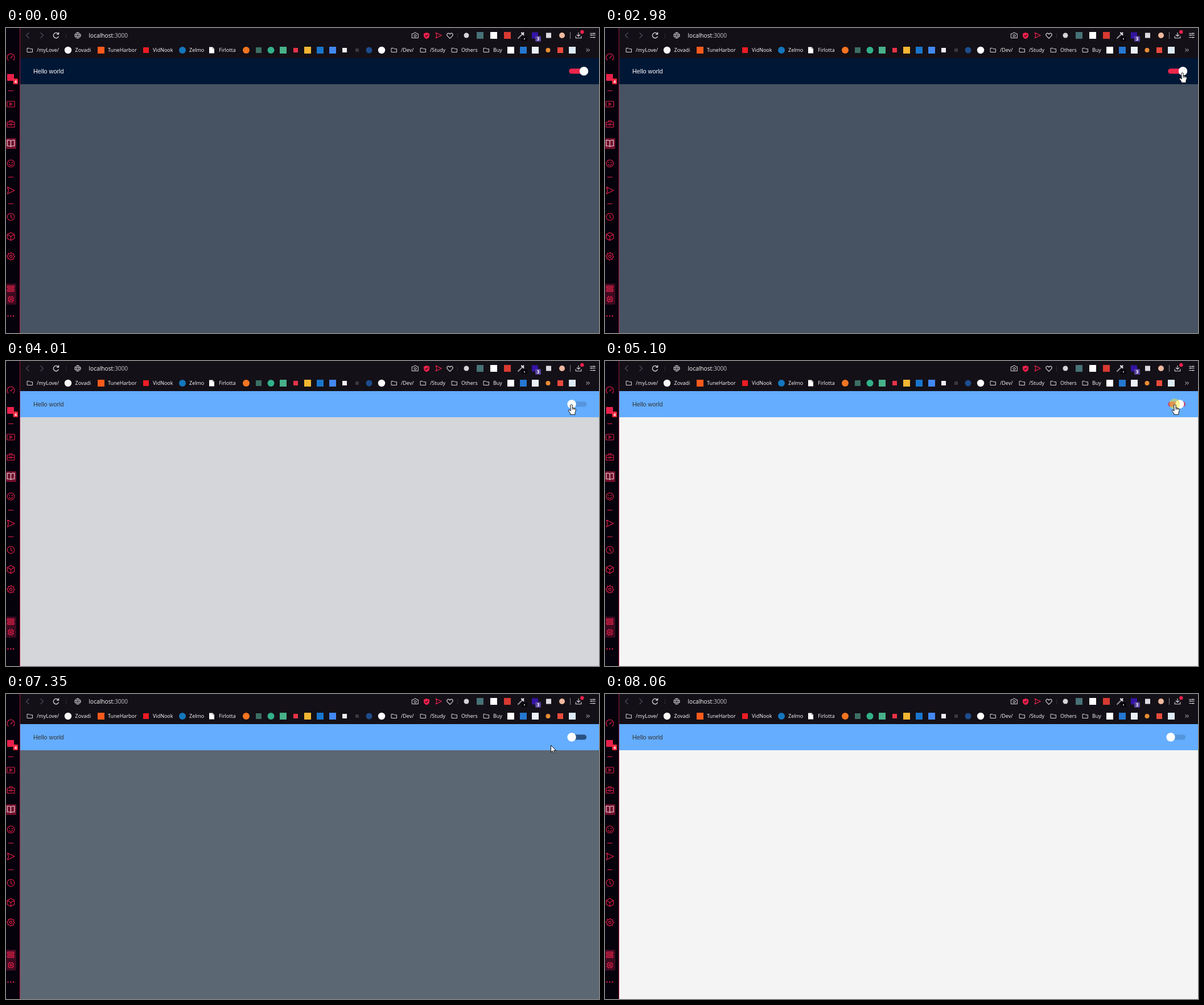
These frames come from a looping animation (1042 by 537 pixels, 8600 ms). An HTML page with a canvas:

```html
<!DOCTYPE html>
<html lang="en">
<head>
<meta charset="utf-8">
<title>Theme switch</title>
<style>
html, body { margin: 0; width: 100%; height: 100%; overflow: hidden; background: #141017; }
canvas { display: block; }
</style>
</head>
<body>
<canvas id="stage" width="1042" height="537"></canvas>
<script>
const W = 1042, H = 537, LOOP = 8600;
const stage = document.getElementById('stage').getContext('2d');
const RED = '#e8204a', PALE = '#dcd9df';

// ---------- drawing helpers ----------
function rect(g, x, y, w, h, color, radius = 0) {
  g.fillStyle = color;
  g.beginPath();
  g.roundRect(x, y, w, h, radius);
  g.fill();
}
function disc(g, x, y, r, color) {
  g.fillStyle = color;
  g.beginPath();
  g.arc(x, y, r, 0, Math.PI * 2);
  g.fill();
}
function text(g, str, x, y, font, color) {
  g.font = font;
  g.fillStyle = color;
  g.fillText(str, x, y);
}
// Path drawn around its own centre
function icon(g, x, y, d, stroke, fill, width = 1.1) {
  const path = new Path2D(d);
  g.save();
  g.translate(x, y);
  g.lineWidth = width;
  g.lineJoin = g.lineCap = 'round';
  if (fill) { g.fillStyle = fill; g.fill(path); }
  if (stroke) { g.strokeStyle = stroke; g.stroke(path); }
  g.restore();
}
const ring = r => `M${r} 0A${r} ${r} 0 1 1 ${-r} 0A${r} ${r} 0 1 1 ${r} 0Z`;
const FOLDER = 'M-4.5-3.5H-1L.3-2.2H4.5V3.5H-4.5Z';

// ---------- browser chrome ----------
function drawSidebar(g) {
  rect(g, 0, 0, 24, H, '#05020c');
  const edge = g.createLinearGradient(0, 0, 0, H);
  edge.addColorStop(0, '#941938');
  edge.addColorStop(1, '#bd1f45');
  rect(g, 24, 0, 1, H, edge);
  rect(g, 0, 194, 18, 19, '#720f2c', 2);
  rect(g, 0, 450, 18, 37, '#3e0a20', 2);

  const line = (y, d) => icon(g, 8.5, y, d, RED);
  line(51.5, 'M-4.5 5A6.5 6.5 0 1 1 4.5 5M0 1L3.2-2.4M-.6 1.3H.6');
  rect(g, 2, 81, 12, 12, RED);
  rect(g, 12.5, 89, 8.5, 10, '#f5283f', 1.5);
  text(g, '4', 14.7, 97, 'bold 7.5px "Open Sans", sans-serif', '#fff');
  for (const y of [110, 262, 309]) rect(g, 4, y, 9, 1, RED);
  line(134, 'M-5.5-5H5.5Q6.7-5 6.7-4V4Q6.7 5 5.5 5H-5.5Q-6.7 5-6.7 4V-4Q-6.7-5-5.5-5ZM-1.6-2.4L2.3 0L-1.6 2.4Z');
  line(169, 'M-6.5-3.5H6.5V5.5H-6.5ZM-2.5-3.5V-6H2.5V-3.5M-6.5 .8H-1.5M1.5 .8H6.5M-1.5-.3H1.5V2H-1.5Z');
  icon(g, 8.5, 203, 'M0-4Q-1-5.5-3-5.5H-6.3V4.8H-2.5Q-.6 4.8 0 6Q.6 4.8 2.5 4.8H6.3V-5.5H3Q1-5.5 0-4V5.5', '#f1dce2');
  line(238.5, ring(6.3) + 'M-3.3 1.3Q0 5.5 3.3 1.3M-3-2H-1.8M1.4-1.6H3.3');
  line(286, 'M-6-6L6.5 0L-6 6L-4 0Z');
  line(332.5, ring(6.3) + 'M0-3.8V0L2.6 2.6');
  line(367, 'M0-7L6.3-3.5V3.5L0 7L-6.3 3.5V-3.5ZM-6.3-3.5L0 0L6.3-3.5M0 0V7');
  // Cog outline
  let cog = '';
  for (let i = 0; i < 32; i++) {
    const a = i * Math.PI / 16, r = i % 4 < 2 ? 6.7 : 5;
    cog += `${i ? 'L' : 'M'}${(r * Math.cos(a)).toFixed(2)} ${(r * Math.sin(a)).toFixed(2)}`;
  }
  line(402, cog + 'Z' + ring(2.1));
  // Memory and processor meters
  for (const y of [454, 460]) {
    rect(g, 3, y, 11, 4, '#8d1631');
    icon(g, 8.5, y + 2, 'M-5.5-2H5.5V2H-5.5Z', RED, null, 1);
  }
  line(477.5, 'M-3.8-3.8H3.8V3.8H-3.8ZM-1.3-1.3H1.3V1.3H-1.3ZM-2-5.4V-4M2-5.4V-4M-2 4V5.4M2 4V5.4M-5.4-2H-4M-5.4 2H-4M4-2H5.4M4 2H5.4');
  for (const x of [3.5, 8.3, 13.1]) disc(g, x, 507, 1.2, RED);
}

function drawToolbar(g) {
  icon(g, 38, 13, 'M2.2-4.6L-2.4 0L2.2 4.6', '#57525c');
  icon(g, 63, 13, 'M-2.2-4.6L2.4 0L-2.2 4.6', '#57525c');
  icon(g, 88, 13, 'M4.3 2A4.7 4.7 0 1 1 3.2-3.4M4.6-5V-2H1.6', PALE, null, 1.3);
  for (const x of [105, 793])
    for (const y of [10, 13, 16]) rect(g, x, y, 1, 1, '#625c67');
  icon(g, 126, 13, ring(5) + 'M-5-1.6H5M-5 1.6H5M0-5Q-4.5 0 0 5Q4.5 0 0-5', PALE, null, 0.9);
  const font = '10.2px "Open Sans", sans-serif';
  text(g, 'localhost', 145.5, 17, font, '#fff');
  const hostWidth = g.measureText('localhost').width;
  text(g, ':3000', 145.5 + hostWidth, 17, font, '#c4c0c7');

  icon(g, 719, 13, 'M-5.3-3H-2.6L-1.5-4.8H1.5L2.6-3H5.3V4.5H-5.3ZM2 .6A2 2 0 1 1-2 .6A2 2 0 1 1 2 .6', PALE, null, 1);
  icon(g, 739, 13.5, 'M0-5.5L5-3.7V0Q5 4 0 5.8Q-5 4-5 0V-3.7Z', null, '#f3204c');
  icon(g, 739, 13.5, 'M-2.2-.2L-.5 1.5L2.4-1.6', '#17111a');
  icon(g, 760, 13, 'M-4.8-4.8L5.3 0L-4.8 4.8L-3 0Z', '#ed244e');
  icon(g, 780, 13.5, 'M0 4.8L-4.5 .3Q-6.2-2-4.2-3.9Q-1.8-5.4 0-2.6Q1.8-5.4 4.2-3.9Q6.2-2 4.5 .3Z', PALE);

  // Extension buttons
  disc(g, 809, 13, 4.5, '#d5d3d6');
  rect(g, 827, 7, 12, 12, '#477277');
  rect(g, 851, 7, 12, 12, '#fff');
  rect(g, 875, 7, 12, 12, '#d83a31');
  icon(g, 905, 13, 'M-5 5L2-2', '#9b969e', null, 2);
  icon(g, 905, 13, 'M1-4.5L4.5-1M2.7-2.7L4.5-4.5', '#eeecef', null, 2.2);
  rect(g, 906, 15, 10, 8, '#08060a', 1);
  rect(g, 910, 18.5, 2, 1.5, '#fff');
  rect(g, 924, 7.5, 11, 11, '#3414a5');
  rect(g, 930, 14, 10, 10, '#56409c', 1.5);
  text(g, '3', 932.8, 22, 'bold 8px "Open Sans", sans-serif', '#fff');
  rect(g, 949, 8.5, 9, 9, '#dedce0');
  disc(g, 977, 13, 5, '#efb99f');

  rect(g, 991, 7, 1, 12, '#86818a');
  icon(g, 1006, 13, 'M0-4.8V1.5M-2.7-1L0 1.7L2.7-1M-4.8 1.5V4.8H4.8V1.5', PALE);
  disc(g, 1012.3, 7, 3.2, '#f5204d');
  icon(g, 1031, 13, 'M-4.5-3.5H4.5M-4.5-.5H4.5M-4.5 3.5H4.5M2-4.4V-2.6M-2-1.4V.4M2 2.6V4.4', PALE, null, 1);
}

function drawBookmarks(g) {
  const label = (str, x) => text(g, str, x, 42, '9px "Open Sans", sans-serif', '#fff');
  const folders = [[42, '/myLove/', 54], [682, '/Dev/', 694], [733, '/Study', 745], [788, 'Others', 800], [844, 'Buy', 856]];
  for (const [x, name, tx] of folders) {
    icon(g, x, 39, FOLDER, PALE, null, 1);
    label(name, tx);
  }
  label('Zovadi', 121.5);
  label('TuneHarbor', 179);
  label('VidNook', 258);
  label('Zelmo', 322);
  label('Firlotta', 374);
  icon(g, 361.5, 39, 'M-4.5-5.5H1.5L4.5-2.5V5.5H-4.5Z', null, '#fff');
  icon(g, 361.5, 39, 'M1.5-5.5V-2.5H4.5', '#8f8c92', null, 0.8);

  const circles = [[109, 6.2, '#f7f7f7'], [310, 6, '#1476bd'], [422, 6, '#f47521'], [465.5, 6, '#32b189'],
    [638, 5.5, '#1d4d8d'], [660, 6.2, '#fff'], [952.5, 4, '#e98c35']];
  for (const [x, r, color] of circles) disc(g, x, 39, r, color);

  const squares = [[167, 12, '#fb5a1c'], [246, 10, '#ed1c24'], [444, 10, '#3c6f63'], [487, 12, '#48b18a'],
    [509, 8, '#e93348'], [530, 12, '#f2b632'], [552, 12, '#1976cc'], [574, 12, '#4388f3'],
    [595, 8, '#f0eef0'], [617, 6, '#3b373e'], [887, 12, '#fff'], [909, 12, '#2578d1'],
    [930, 12, '#eaf0f5'], [974, 10, '#ea4a3c'], [995, 12, '#dceaf5']];
  for (const [x, size, color] of squares) rect(g, x - size / 2, 39 - size / 2, size, size, color);
  icon(g, 1022.5, 39, 'M-2.7-2.3L-.4 0L-2.7 2.3M.6-2.3L2.9 0L.6 2.3', PALE, null, 1);
}

const chrome = document.createElement('canvas');
chrome.width = W;
chrome.height = H;
{
  const g = chrome.getContext('2d');
  rect(g, 0, 0, W, 53, '#141017');
  drawSidebar(g);
  drawToolbar(g);
  drawBookmarks(g);
}

// ---------- motion ----------
const clamp = v => Math.min(1, Math.max(0, v));
const mix = (a, b, p) => a + (b - a) * p;
const blend = (a, b, p) => a.map((v, i) => mix(v, b[i], p));
const rgb = c => `rgb(${c.map(Math.round)})`;

// Equivalent of the CSS "ease" curve
function ease(x) {
  if (x <= 0 || x >= 1) return clamp(x);
  let lo = 0, hi = 1;
  for (let i = 0; i < 18; i++) {
    const s = (lo + hi) / 2, q = 1 - s;
    if (0.75 * s * q + s * s * s < x) lo = s; else hi = s;
  }
  const s = lo, q = 1 - s;
  return 0.3 * s * q * q + 3 * s * s * q + s * s * s;
}
const ramp = (t, start, length) => ease((t - start) / length);

const isLight = t => t >= 3690 && t < 5400 || t >= 7210;
const switchOn = t => 1 - ramp(t, 3270, 150) + ramp(t, 5035, 150) - ramp(t, 6830, 150);
function bodyLight(t) {
  if (t > 5810 && t < 5960) t = 5810;
  return ramp(t, 3735, 540) - ramp(t, 5423, 700) + ramp(t, 7257, 800);
}

const CLICKS = [[3210, 993], [4990, 1001], [6790, 1004]];
const POINTER = [
  [340, 946, 518], [500, 913, 424], [600, 908, 362], [700, 924, 318], [790, 936, 292], [900, 912, 313],
  [1180, 912, 313], [1230, 883, 304], [1400, 782, 299], [1590, 697, 280], [1655, 697, 280], [1730, 657, 240],
  [1850, 690, 180], [2030, 828, 125], [2300, 930, 105], [2550, 1028, 85], [2750, 1014, 78],
  [2980, 1014, 78], [3200, 993, 76], [4680, 993, 76], [4950, 1001, 76], [5250, 1001, 76],
  [5570, 1004, 77], [5810, 1015, 88], [6330, 1015, 88], [6550, 1012, 78], [6750, 1004, 76],
  [6950, 1003, 76], [7160, 957, 87], [7350, 957, 90], [7500, 957, 90], [7900, 948, 537]
];
function pointerAt(t) {
  const next = POINTER.findIndex(k => k[0] > t);
  if (next < 1) return null;
  const [t0, x0, y0] = POINTER[next - 1], [t1, x1, y1] = POINTER[next];
  const p = (t - t0) / (t1 - t0);
  return [mix(x0, x1, p), mix(y0, y1, p)];
}

const ARROW = 'M0 0V12.2L2.8 9.6L4.9 14L6.8 13.1L4.8 8.9H8.6Z';
const HAND = 'M-1.6 1Q0-.8 1.6 1V6L3.4 6.2L5.4 6.8L7.2 7.6Q8 8.2 7.8 10.5L6.5 14.2V17.8H-1.8V15.8L-5 11.4Q-5.4 9.2-3.6 9.6L-1.6 11.2Z';

function drawSwitch(g, t, light, glow) {
  const on = switchOn(t), dim = [0, 20, 46];
  const off = light ? blend(dim, [85, 149, 220], clamp(glow * 3.8)) : dim;
  rect(g, 989.3, 71.4, 30.8, 9.2, rgb(blend(off, [240, 38, 76], on)), 4.6);
  disc(g, mix(994, 1015.5, on), 76, 7.7, '#fff');
}

function drawPointer(g, t) {
  for (const [start, x] of CLICKS) {
    const age = (t - start) / 230;
    if (age >= 0 && age < 1) {
      g.globalAlpha = 0.65 * (1 - age * age);
      disc(g, x, 75.5, 9.5, '#f4e52c');
      g.globalAlpha = 1;
    }
  }
  const at = pointerAt(t);
  if (!at) return;
  const x = Math.round(at[0]) + 0.5, y = Math.round(at[1]) + 0.5;
  const overSwitch = x >= 986 && x <= 1024 && y >= 66 && y <= 85;
  icon(g, x, y, overSwitch ? HAND : ARROW, '#111', '#fff', 1);
  if (overSwitch) icon(g, x, y, 'M1.6 6V9M3.6 6.6V9M5.6 7.2V9.2', '#111', null, 0.8);
}

function render(t) {
  const g = stage, light = isLight(t), glow = bodyLight(t);
  g.drawImage(chrome, 0, 0);
  rect(g, 25, 53, W - 25, 46, light ? '#64adff' : '#001736');
  rect(g, 25, 99, W - 25, H - 99, rgb(blend([71, 83, 98], [244, 244, 244], glow)));
  text(g, 'Hello world', 48, 80, '10.8px "Liberation Sans", Arial, sans-serif', light ? '#333' : '#fff');
  drawSwitch(g, t, light, glow);
  drawPointer(g, t);
}

const begin = performance.now();
function tick() {
  render((performance.now() - begin) % LOOP);
  requestAnimationFrame(tick);
}
tick();
</script>
</body>
</html>
```
